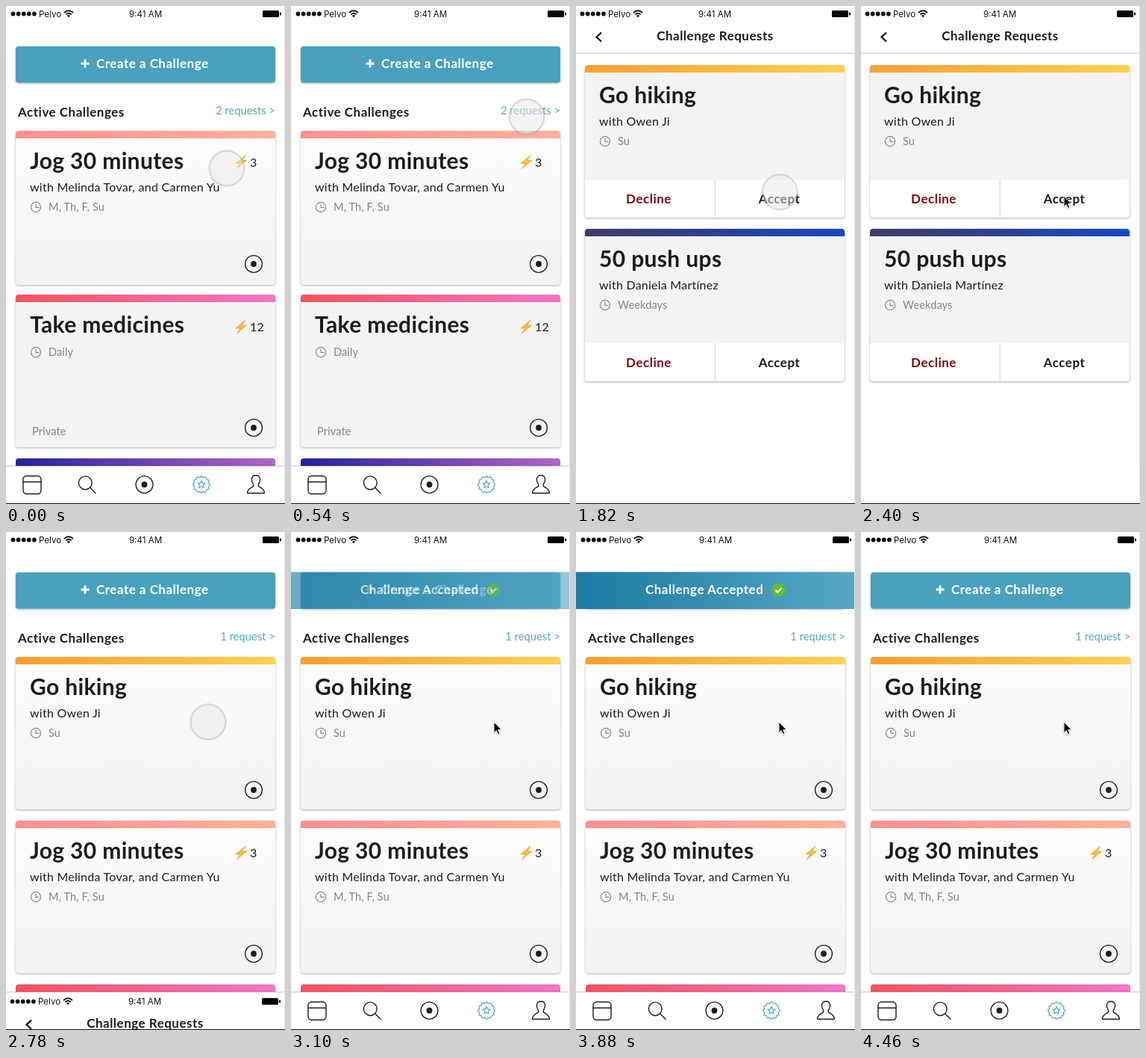
These frames come from a looping animation (374 px wide and 666 px high, 4480 ms). An HTML page:

```html
<!DOCTYPE html>
<html lang="en">
<head>
<meta charset="utf-8">
<title>Challenges</title>
<style>
html, body { margin: 0; width: 100%; height: 100%; overflow: hidden; background: #fff; }
svg { display: block; width: 374px; height: 666px; }
text { font-family: Lato, "Open Sans", sans-serif; fill: #1c1c1c; }
.status { font-family: Inter, Roboto, sans-serif; font-size: 11.6px; fill: #111; }
.title { font-size: 30px; font-weight: 700; letter-spacing: .35px; }
.sub { font-size: 16px; letter-spacing: .25px; }
.note { font-size: 14.6px; letter-spacing: .1px; fill: #858585; }
.label { font-size: 17px; font-weight: 700; letter-spacing: .5px; }
.white { fill: #fff; }
.red { fill: #7c0a0e; }
.link { font-size: 14.8px; fill: #55a9c4; }
.line { fill: none; stroke: #1c1c1c; stroke-width: 1.4; stroke-linecap: round; stroke-linejoin: round; }
.card { filter: drop-shadow(0 1px 1.5px rgba(0,0,0,.32)); }
</style>
</head>
<body>
<svg id="stage" viewBox="0 0 374 666" xmlns="http://www.w3.org/2000/svg"></svg>
<script>
const LOOP = 4480;
const stage = document.getElementById('stage');

const themes = {
  coral: ['#fe8f8c', '#ffb09c'],
  pink: ['#f6525c', '#f475c8'],
  violet: ['#2522a2', '#b363c6'],
  amber: ['#faa033', '#fdd24e'],
  navy: ['#433c66', '#1448c4'],
  banner: ['#1c7aa3', '#56a8c2']
};

const text = (x, y, cls, s, anchor = 'start') =>
  `<text x="${x}" y="${y}" class="${cls}" text-anchor="${anchor}">${s}</text>`;
const rect = (x, y, w, h, fill, r = 0) =>
  `<rect x="${x}" y="${y}" width="${w}" height="${h}" rx="${r}" fill="${fill}"/>`;
const line = (d, extra = '') => `<path class="line" d="${d}" ${extra}/>`;
const ring = (x, y, r, extra = '') => `<circle class="line" cx="${x}" cy="${y}" r="${r}" ${extra}/>`;
const dot = (x, y, r, fill = '#1c1c1c') => `<circle cx="${x}" cy="${y}" r="${r}" fill="${fill}"/>`;
const target = (x, y) => ring(x, y, 11.4) + dot(x, y, 3.9);

function clock(x, y) {
  const c = 'style="stroke:#8a8a8a;stroke-width:1.2"';
  return ring(x, y, 6.6, c) + line(`M${x} ${y - 4}v4.4h4`, c);
}

function bolt(y, n) {
  return `<path d="M321 ${y - 9}L308 ${y + 2}L314 ${y + 2}L309.500 ${y + 9}L322.500 ${y - 2}L316.500 ${y - 2}Z"
    fill="#fdc02f" stroke="#f39a3a" stroke-width=".8"/>` + text(327, y + 6, 'sub', n);
}

function topBar(x, y, w, theme) {
  return `<path d="M${x} ${y + 10}v-6q0-4 4-4h${w - 8}q4 0 4 4v6z" fill="url(#${theme})"/>`;
}

function status(x) {
  let s = '';
  for (let i = 0; i < 5; i++) s += dot(x + 9.5 + i * 7.1, 10.5, 2.9, '#111');
  s += text(x + 44, 15, 'status', 'Pelvo') + text(x + 187, 15, 'status', '9:41 AM', 'middle');
  const w = 'style="stroke:#111;stroke-width:1.9;stroke-linecap:butt"';
  s += line(`M${x + 78} 9q6-5.500 12 0M${x + 80.3} 11.400q3.700-3.400 7.400 0`, w);
  s += `<path d="M${x + 81.8} 12.800q2.200-1.800 4.400 0l-2.200 2.400z" fill="#111"/>`;
  return s + rect(x + 344, 6, 22, 9, '#050505', 1.5) + rect(x + 367, 8.5, 2, 4, '#050505', 1);
}

function challenge(y, h, c) {
  const row = c.who ? 102 : 77;
  let s = `<g class="card">${rect(13, y, 348, h, c.flat ? '#f3f3f3' : 'url(#paper)', 4)}</g>`;
  s += topBar(13, y, 348, c.theme);
  s += text(32, y + 51, 'title', c.name);
  if (c.who) s += text(32, y + 80.5, 'sub', c.who);
  s += clock(40, y + row) + text(57, y + row + 4.5, 'note', c.days);
  if (c.streak) s += bolt(y + (y < 200 ? 41.5 : 43), c.streak);
  if (c.flat) s += text(35, y + 188, 'note', 'Private');
  return s + target(332, y + 178);
}

function request(y, c) {
  return `<g class="card">${rect(12, y, 348, 204, '#fff', 4)}</g>` +
    rect(12, y + 10, 348, 143, '#f3f3f3') + topBar(12, y, 348, c.theme) +
    text(31, y + 51, 'title', c.name) + text(31, y + 80.5, 'sub', c.who) +
    clock(39, y + 102) + text(56, y + 106.5, 'note', c.days) +
    rect(185.5, y + 153, 1.5, 51, '#e2e2e2') +
    text(97.5, y + 184.5, 'label red', 'Decline', 'middle') +
    text(272.5, y + 184.5, 'label', 'Accept', 'middle');
}

const jog = { theme: 'coral', name: 'Jog 30 minutes', who: 'with Melinda Tovar, and Carmen Yu', days: 'M, Th, F, Su', streak: 3 };
const meds = { theme: 'pink', name: 'Take medicines', days: 'Daily', streak: 12, flat: true };
const hike = { theme: 'amber', name: 'Go hiking', who: 'with Owen Ji', days: 'Su' };
const push = { theme: 'navy', name: '50 push ups', who: 'with Daniela Martínez', days: 'Weekdays' };

function polar(n, radius) {
  let d = '';
  for (let i = 0; i < n; i++) {
    const a = i / n * 2 * Math.PI - Math.PI / 2, r = radius(i);
    d += `${i ? 'L' : 'M'}${(262 + r * Math.cos(a)).toFixed(2)} ${(640 + r * Math.sin(a)).toFixed(2)}`;
  }
  return d + 'Z';
}

function tabs() {
  const blue = 'style="stroke:#55a9c4;stroke-width:1.3"';
  return `<g style="filter:drop-shadow(0 -1px 1px rgba(0,0,0,.25))">${rect(0, 616, 373, 50, '#fff')}</g>` +
    '<rect class="line" x="23" y="628.5" width="24" height="24" rx="4.500"/>' + line('M23 636.500h24') +
    ring(106.3, 637.8, 8.9) + line('M112.800 644.300L120 651.500') +
    target(185.5, 640) +
    line(polar(96, i => 10.6 + .8 * Math.cos(i / 8 * 2 * Math.PI)), blue) +
    line(polar(10, i => i % 2 ? 2.5 : 5.2), blue) +
    line('M335 627.500c-4 0-5.800 3-5.600 6.300c.2 3 1.500 4.500 2.300 6v2.200c-1.500 2-8 2.500-8.200 9.500h23c-.2-7-6.700-7.500-8.200-9.500v-2.200c.8-1.500 2.100-3 2.300-6c.2-3.300-1.600-6.300-5.600-6.300z');
}

function list(id, link, firstHeight, first, second, theme) {
  return `<g id="${id}">` + text(361, 145, 'link', link, 'end') +
    challenge(167, firstHeight, first) + challenge(386, 204, second) +
    topBar(13, 605, 348, theme) + '</g>';
}

const gradients = Object.entries(themes).map(([id, [a, b]]) =>
  `<linearGradient id="${id}"><stop stop-color="${a}"/><stop offset="1" stop-color="${b}"/></linearGradient>`).join('');

stage.innerHTML = `<defs>${gradients}
  <linearGradient id="paper" x2="0" y2="1"><stop stop-color="#fdfdfd"/><stop offset="1" stop-color="#f2f2f2"/></linearGradient></defs>` +
  rect(0, 0, 374, 666, '#fff') + status(0) +
  `<g class="card">${rect(13, 54, 348, 48.5, '#4aa1bb', 4)}</g>` +
  '<path d="M106 71.500v11M100.500 77h11" stroke="#fff" stroke-width="2.8"/>' +
  text(121, 83, 'label white', 'Create a Challenge') +
  `<g id="banner">${rect(0, 53.5, 374, 49.5, 'url(#banner)')}` +
  text(93, 82.5, 'label white', 'Challenge Accepted') + dot(271.5, 77.5, 9, '#6cb92d') +
  '<path d="M267.500 77.800l2.800 2.700l5.200-5.300" fill="none" stroke="#fff" stroke-width="2.2"/></g>' +
  text(16, 147.5, 'label', 'Active Challenges') +
  list('before', '2 requests &gt;', 206, jog, meds, 'violet') +
  list('after', '1 request &gt;', 204, hike, jog, 'pink') +
  tabs() + rect(373, 0, 1, 615, '#e6e6e6') +
  `<g id="sheet">${rect(0, 0, 373, 666, '#fff')}${status(-1)}` +
  '<path d="M34 35.500l-6.500 6l6.500 6" fill="none" stroke="#1c1c1c" stroke-width="2.3"/>' +
  text(186.5, 46, 'label', 'Challenge Requests', 'middle') +
  rect(0, 62.5, 373, 1.5, '#d9d9d9') + request(79, hike) + request(298, push) + '</g>' +
  rect(0, 665, 374, 1, '#111') +
  '<circle id="touch" r="23.5" fill="rgba(232,232,232,.5)" stroke="rgba(120,120,120,.24)" stroke-width="2.4"/>' +
  '<path id="arrow" d="M272 254v14.500l3.300-3l2.200 5l2.400-1l-2.200-4.900h4.500z" fill="#000" stroke="#fff" stroke-width="1" style="filter:drop-shadow(0 1px 1px rgba(0,0,0,.3))"/>';

const el = id => document.getElementById(id);
const parts = Object.fromEntries(['sheet', 'before', 'after', 'touch', 'arrow'].map(id => [id, el(id)]));
const banner = stage.querySelector('g#banner');

const progress = (t, a, b) => Math.min(1, Math.max(0, (t - a) / (b - a)));
const ease = p => p < .5 ? 4 * p ** 3 : 1 - 4 * (1 - p) ** 3;
const smooth = p => p * p * (3 - 2 * p);
const show = (node, on) => { node.style.display = on ? '' : 'none'; };

// Pointer stops: x, y, start and end of the move towards them.
const stops = [[316, 148, 0, 540], [318, 146, 560, 700], [271, 254, 1300, 1900]];

function draw(t) {
  let x = 296, y = 217;
  for (const [tx, ty, a, b] of stops) {
    const p = smooth(progress(t, a, b));
    x += (tx - x) * p;
    y += (ty - y) * p;
  }
  const idle = t >= 2100 && t < 2480 || t >= 2960;
  parts.touch.setAttribute('transform', `translate(${x} ${y})`);
  show(parts.touch, !idle);
  show(parts.arrow, idle);

  const dx = 374 * (1 - ease(progress(t, 720, 1040)));
  const dy = 666 * ease(progress(t, 2560, 2860));
  parts.sheet.setAttribute('transform', `translate(${dx} ${dy})`);
  show(parts.sheet, dx < 374 && dy < 666);
  show(parts.before, t < 2000);
  show(parts.after, t >= 2000);

  const alpha = smooth(progress(t, 2960, 3200)) - smooth(progress(t, 4040, 4300));
  banner.style.opacity = alpha;
}

function tick(now) {
  draw(now % LOOP);
  requestAnimationFrame(tick);
}
draw(0);
requestAnimationFrame(tick);
</script>
</body>
</html>
```
